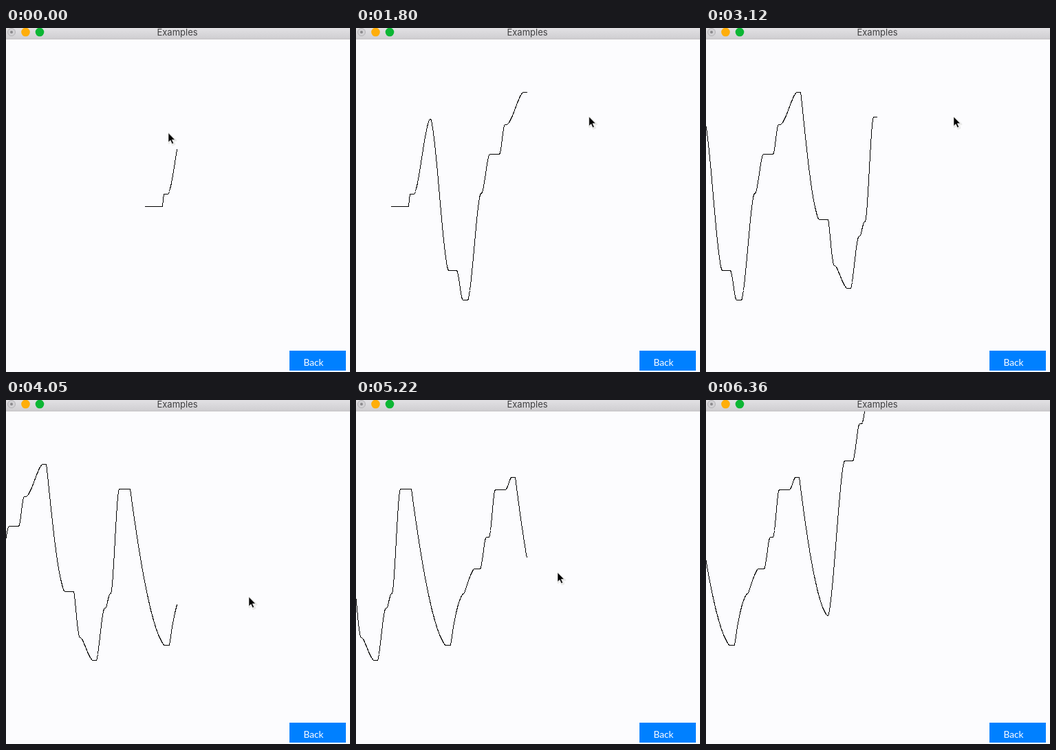
Write an HTML page that moves like this. It is 500x500 px and loops after 6.39 s.

```html
<!DOCTYPE html>
<html lang="en">
<head>
<meta charset="utf-8">
<title>Examples</title>
<style>
  html, body { margin: 0; width: 100%; height: 100%; overflow: hidden; background: #fcfcfe; }
  svg { display: block; width: 100%; height: 100%; }
</style>
</head>
<body>
<svg viewBox="0 0 500 500">
  <defs>
    <linearGradient id="bar" x1="0" y1="0" x2="0" y2="1">
      <stop offset="0" stop-color="#e2e1e4"/>
      <stop offset="1" stop-color="#cfced1"/>
    </linearGradient>
  </defs>
  <rect width="500" height="500" fill="#fcfcfe"/>
  <path id="trace" fill="none" stroke="#000" stroke-width="1" shape-rendering="crispEdges"/>

  <rect width="500" height="16" fill="url(#bar)"/>
  <rect y="15.5" width="500" height="1" fill="#bdbcbe"/>
  <circle cx="8" cy="6" r="5.5" fill="#d2d1d4" stroke="#b3b2b5"/>
  <circle cx="8" cy="6" r="2" fill="#8b8a8d"/>
  <circle cx="28.5" cy="6" r="6.3" fill="#ffae0a"/>
  <circle cx="49" cy="6" r="6.3" fill="#0cb634"/>
  <text x="249" y="10.7" text-anchor="middle" font-family="Inter, Roboto, sans-serif" font-size="13" fill="#404042">Examples</text>

  <rect x="412" y="469" width="82" height="29" fill="#0080ff"/>
  <text x="432.5" y="491" font-family="Lato, sans-serif" font-size="13.7" fill="#fff">Back</text>

  <g id="pointer">
    <path d="M0 0V14L3.2 11 5.6 16.5 8.4 15.3 6 10H10.5Z" transform="translate(.7 1)" fill="#ddd" stroke="#e6e6e4" stroke-width="2.5" stroke-linejoin="round" opacity=".75"/>
    <path d="M0 0V13.5L3.1 10.6 5.4 15.8 7.6 14.8 5.3 9.8H9.6Z" fill="#000" stroke="#fff" stroke-width=".6"/>
  </g>
</svg>
<script>
const LOOP = 6390, STEP = 30, HEAD = 248, LAG = 4;

// Where the hand rests along the strip: from, to, height, bend of the stroke leading there.
const rests = [
  [201, 228, 259], [229, 236, 241], [258, 260, 132], [285, 298, 352],
  [306, 314, 395], [332, 334, 240], [345, 360, 183], [367, 371, 140],
  [394, 400, 93], [426, 440, 278, .7], [448, 450, 345, .8], [467, 473, 378, .9],
  [484, 486, 302, .9], [492, 494, 281], [505, 522, 129], [571, 579, 356, .65],
  [597, 598, 281, .6], [613, 622, 245, .8], [630, 635, 199], [643, 659, 130],
  [667, 673, 112], [713, 715, 313, .65], [738, 751, 88], [760, 764, 34], [774, 774, -20]
];

// Time, scroll distance, pointer x.
const keys = [
  [0, 0, 236], [1110, 92, 326], [2430, 204, 350], [3120, 262, 360],
  [4050, 341, 353], [5220, 441, 293], [6360, 537, 300]
];

// Holds at each stop and moves between stops; softness blends linear into smoothstep.
function glide(stops, x, softness) {
  const i = stops.findIndex(([, to]) => x <= to);
  if (i < 0) return stops[stops.length - 1][2];
  const [from, , value, bend = 1] = stops[i];
  if (i === 0 || x >= from) return value;
  const [, left, before] = stops[i - 1];
  const u = ((x - left) / (from - left)) ** bend;
  const eased = u + (u * u * (3 - 2 * u) - u) * softness;
  return before + (value - before) * eased;
}

const height = x => glide(rests, x, .6);
const scroll = t => glide(keys.map(([at, distance]) => [at, at, distance]), t, 0);
const pointerX = t => glide(keys.map(([at, , x]) => [at, at, x]), t, .5);
const trace = document.getElementById("trace");
const pointer = document.getElementById("pointer");

function draw(time) {
  const t = Math.floor(time % LOOP / STEP) * STEP;
  const shift = Math.round(scroll(t)) + .6;
  let d = "";
  for (let x = Math.max(-1, Math.ceil(rests[0][0] - shift)); x <= HEAD; x++) {
    d += `${d ? "L" : "M"}${x + .5} ${Math.round(height(x + shift)) + .5}`;
  }
  trace.setAttribute("d", d);
  pointer.setAttribute("transform", `translate(${pointerX(t)} ${height(HEAD + LAG + shift)})`);
}

const start = performance.now();
function tick() {
  draw(performance.now() - start);
  requestAnimationFrame(tick);
}
tick();
</script>
</body>
</html>
```
